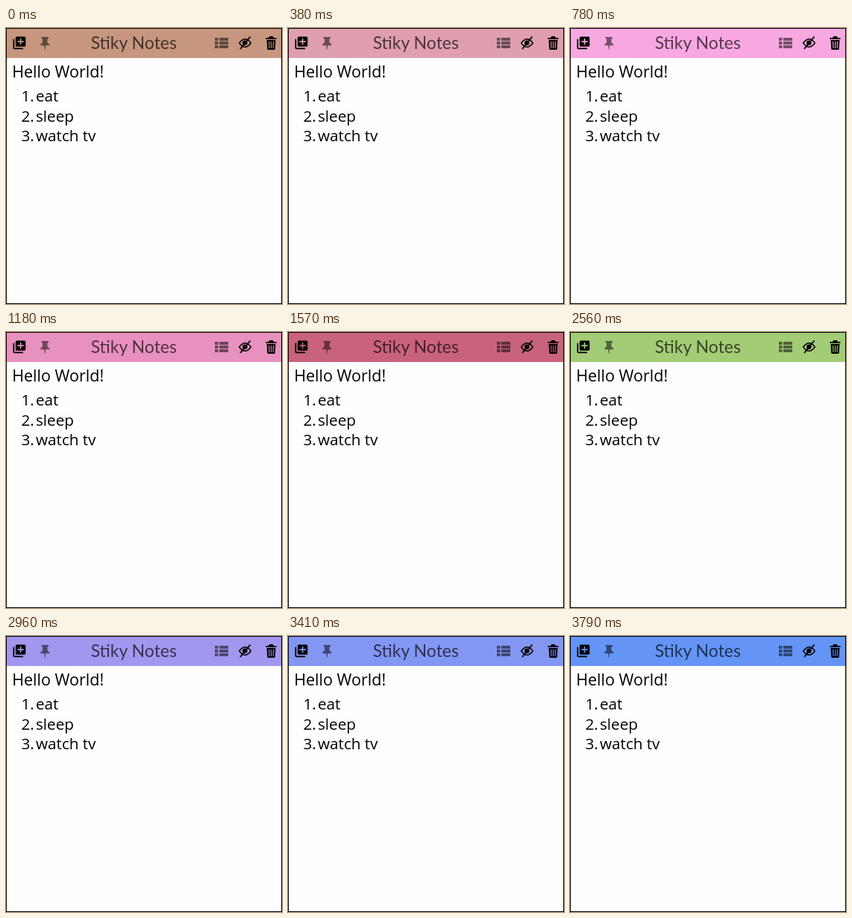
An HTML page that plays this animation: 370x368 px, repeating every 4170 ms.

```html
<!DOCTYPE html>
<html lang="en">
<head>
<meta charset="utf-8">
<title>Notes</title>
<style>
  html, body { margin: 0; width: 100%; height: 100%; overflow: hidden; background: #fefefe; }
  svg { display: block; width: 370px; height: 368px; }
  .bar { animation: tint 4170ms step-end infinite; }
  .title { font: 23px Lato, Carlito, sans-serif; fill: #000; opacity: .66; text-anchor: middle; }
  .note { font: 20.7px "Open Sans", "Noto Sans", sans-serif; }
  .head { font-size: 21.5px; }
  .dim { opacity: .52; }
  .line { fill: none; stroke: #000; }

  @keyframes tint {
    0%      { fill: #c6967f; }
    9.113%  { fill: #df9fb0; }
    18.705% { fill: #f8a8e0; }
    28.297% { fill: #e891bf; }
    33.813% { fill: #d97a9e; }
    35.731% { fill: #d16f8d; }
    37.65%  { fill: #c9637c; }
    50.36%  { fill: #ef7067; }
    61.391% { fill: #a3cc76; }
    70.983% { fill: #a197ee; }
    81.775% { fill: #8396f2; }
    90.887% { fill: #6495f6; }
    100%    { fill: #6495f6; }
  }
</style>
</head>
<body>
<svg viewBox="0 0 370 368">
  <rect width="370" height="368" fill="#fefefe"/>
  <rect class="bar" x="1" y="1" width="368" height="39"/>
  <rect class="line" x=".5" y=".5" width="369" height="367"/>

  <!-- add -->
  <path transform="translate(7.8 9.7) scale(.84)" d="M4 6H2v14c0 1.1.9 2 2 2h14v-2H4V6zm16-4H8c-1.1 0-2 .9-2 2v12c0 1.1.9 2 2 2h12c1.1 0 2-.9 2-2V4c0-1.1-.9-2-2-2zm-1 9h-4v4h-2v-4H9V9h4V5h2v4h4v2z"/>

  <!-- pin -->
  <path class="dim" d="M47.5 12h9.5v2.2h-1.5v5.3q3 1.3 3 3.7h-5.3l-.6 5.3h-.8l-.6-5.3H46q0-2.4 3-3.7v-5.3h-1.5z"/>

  <text class="title" x="171.3" y="28">Stiky Notes</text>

  <!-- list -->
  <path class="dim" d="M280 13h4.5v4H280zm6 0h12v4h-12zM280 18h4.5v4H280zm6 0h12v4h-12zM280 23h4.5v4H280zm6 0h12v4h-12z"/>

  <!-- hide -->
  <path class="line" stroke-width="1.5" d="M312.7 20Q320.5 9.5 328.3 20Q320.5 30.5 312.7 20z"/>
  <circle cx="320.3" cy="19.8" r="3.3"/>
  <path class="line" stroke-width="1.9" d="M327.5 11.5L314 28"/>

  <!-- delete -->
  <path d="M348.5 13h3.7l1-2h4.6l1 2h3.7v2h-14z"/>
  <path fill-rule="evenodd" d="M349.5 16h12l-.8 12q-.1 1-1.1 1h-8.2q-1 0-1.1-1zM352 18l.4 9h1.1l-.3-9zm3 0v9h1v-9zm2.8 0l-.3 9h1.1l.4-9z"/>

  <g class="note">
    <text class="head" x="8.2" y="66">Hello World!</text>
    <text x="20.5" y="98">1.</text><text x="40" y="98">eat</text>
    <text x="20.5" y="125">2.</text><text x="40" y="125">sleep</text>
    <text x="20.5" y="151">3.</text><text x="40" y="151">watch tv</text>
  </g>
</svg>
</body>
</html>
```
